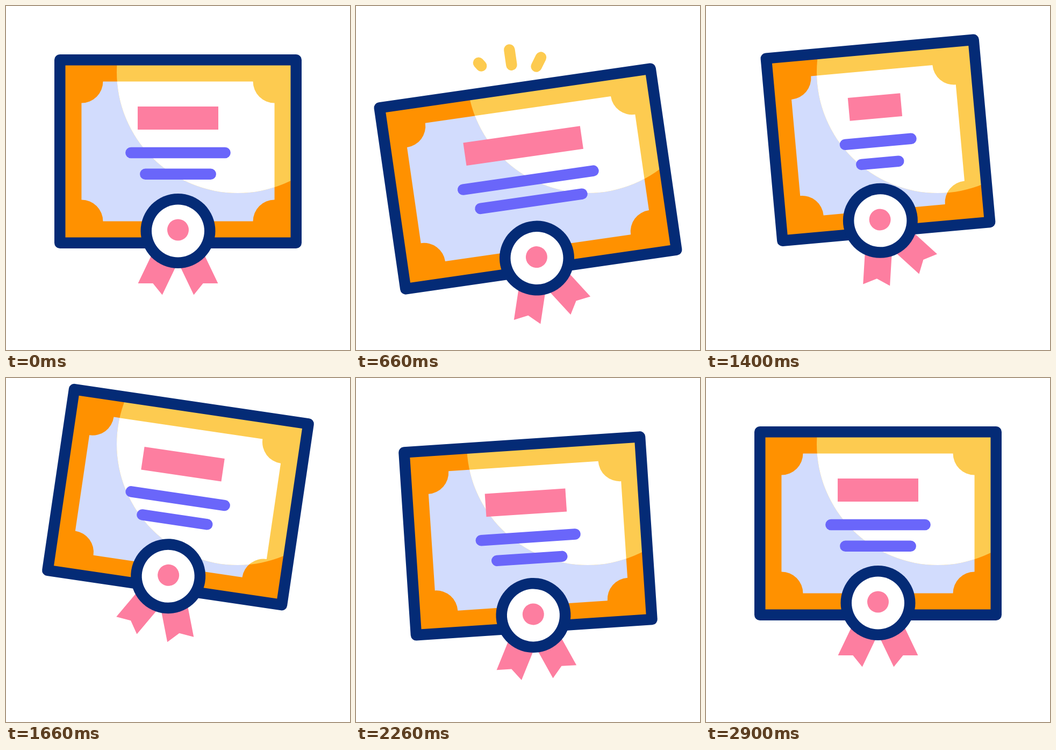
Recreate the animation shown at these times as an HTML page with a canvas. Size 640 px wide and 640 px high, loop 3.02 s.

```html
<!DOCTYPE html>
<html lang="en">
<head>
<meta charset="utf-8">
<title>Certificate</title>
<style>
html, body { margin: 0; width: 100%; height: 100%; overflow: hidden; background: #fff; }
canvas { display: block; width: 640px; height: 640px; }
</style>
</head>
<body>
<canvas id="stage" width="640" height="640"></canvas>
<script>
const c = document.getElementById('stage').getContext('2d');
const LOOP = 3020, TAU = Math.PI * 2, RAD = Math.PI / 180, LINE = 20.5;
const NAVY = '#042b76', PINK = '#fd7ea0', PURPLE = '#6a66fa', YELLOW = '#fdcb50';

// Keys are [time, value] pairs
const bob = [[0, 270.5], [933, 334.7], [1630, 221], [2200, 295.5], [2580, 270.5]];
const tilt = [[150, 0], [1120, -15.2], [1780, 10.6], [2350, -4.8], [2760, 0]];
const stretch = [[0, 0], [790, 75], [1420, -52.5], [1800, 24], [2120, 0]];
const swing = [[250, 0], [1240, -23.5], [1870, 16.4], [2420, -3.8], [2900, 0]];

// x, y of the inner end, x, y of the outer end, start of growing, start of shrinking
const sparks = [
  [-45.3, -204.6, -60.3, -226.7, 110, 500],
  [0, -214, 0, -242.5, 270, 690],
  [45.3, -204.6, 60.5, -226.7, 501, 878]
];

function ease(x) {
  x = Math.min(1, Math.max(0, x));
  return x * x * (3 - 2 * x);
}

function track(keys, t) {
  let value = keys[0][1];
  for (let i = 1; i < keys.length; i++) {
    const [t0, v0] = keys[i - 1], [t1, v1] = keys[i];
    value += (v1 - v0) * ease((t - t0) / (t1 - t0));
  }
  return value;
}

function line(x0, y0, x1, y1, color) {
  c.strokeStyle = color;
  c.beginPath();
  c.moveTo(x0, y0);
  c.lineTo(x1, y1);
  c.stroke();
}

function disc(x, y, r, color) {
  c.fillStyle = color;
  c.beginPath();
  c.arc(x, y, r, 0, TAU);
  c.fill();
}

function drawSheet(half, frame, paper) {
  const w = half - 40.2, h = 130;
  c.fillStyle = frame;
  c.fillRect(-half, -170.25, half * 2, 340.5);
  c.fillStyle = paper;
  c.beginPath();
  [[-w, -h, 1], [w, -h, 2], [w, h, 3], [-w, h, 4]].forEach(([x, y, q]) =>
    c.arc(x, y, 40, q * TAU / 4, (q - 1) * TAU / 4, true));
  c.fill();
}

function drawRibbon(angle) {
  c.save();
  c.rotate(angle * RAD);
  c.fillStyle = PINK;
  c.beginPath();
  [[-25, 0], [-25, 120], [0, 108], [25, 120], [25, 0]].forEach(p => c.lineTo(...p));
  c.fill();
  c.restore();
}

function inSeal(angle, draw) {
  c.save();
  c.translate(0, 179);
  c.rotate(angle);
  c.translate(0, -31);
  draw();
  c.restore();
}

function drawSpark([x0, y0, x1, y1, grow, shrink], t) {
  const from = ease((t - shrink) / 250), to = ease((t - grow) / 250);
  if (to <= 0 || from >= 1) return;
  const dx = x1 - x0, dy = y1 - y0;
  line(x0 + dx * from, y0 + dy * from, x0 + dx * to, y0 + dy * to, YELLOW);
}

function draw(t) {
  const y = track(bob, t), angle = track(tilt, t) * RAD;
  const sealAngle = track(swing, t) * RAD;
  const grow = track(stretch, t) / 2, half = 219.75 + grow;

  c.setTransform(1, 0, 0, 1, 0, 0);
  c.fillStyle = '#fff';
  c.fillRect(0, 0, 640, 640);
  c.lineWidth = LINE;
  c.lineCap = c.lineJoin = 'round';
  c.translate(320, y);
  c.rotate(angle);

  sparks.forEach(s => drawSpark(s, t));
  inSeal(sealAngle, () => {
    drawRibbon(25.6);
    drawRibbon(-25.6);
  });

  drawSheet(half, '#ff9100', '#d2dcfd');
  // The glare stays still while the card moves under it
  c.save();
  const pose = c.getTransform();
  c.resetTransform();
  c.beginPath();
  c.arc(431, 123, 225, 0, TAU);
  c.clip();
  c.setTransform(pose);
  drawSheet(half, YELLOW, '#fff');
  c.restore();

  c.fillStyle = PINK;
  c.fillRect(-75 - grow, -83.5, 150 + grow * 2, 43);
  line(-87.6 - grow, 2.6, 87.6 + grow, 2.6, PURPLE);
  line(-60.7 - grow, 42.2, 60.7 + grow, 42.2, PURPLE);
  c.strokeStyle = NAVY;
  c.strokeRect(-half, -170.25, half * 2, 340.5);

  inSeal(sealAngle, () => {
    disc(0, 0, 69.5, NAVY);
    disc(0, 0, 49, '#fff');
    disc(0, -2, 20, PINK);
  });
}

const start = performance.now();
function tick() {
  draw((performance.now() - start) % LOOP);
  requestAnimationFrame(tick);
}
tick();
</script>
</body>
</html>
```
